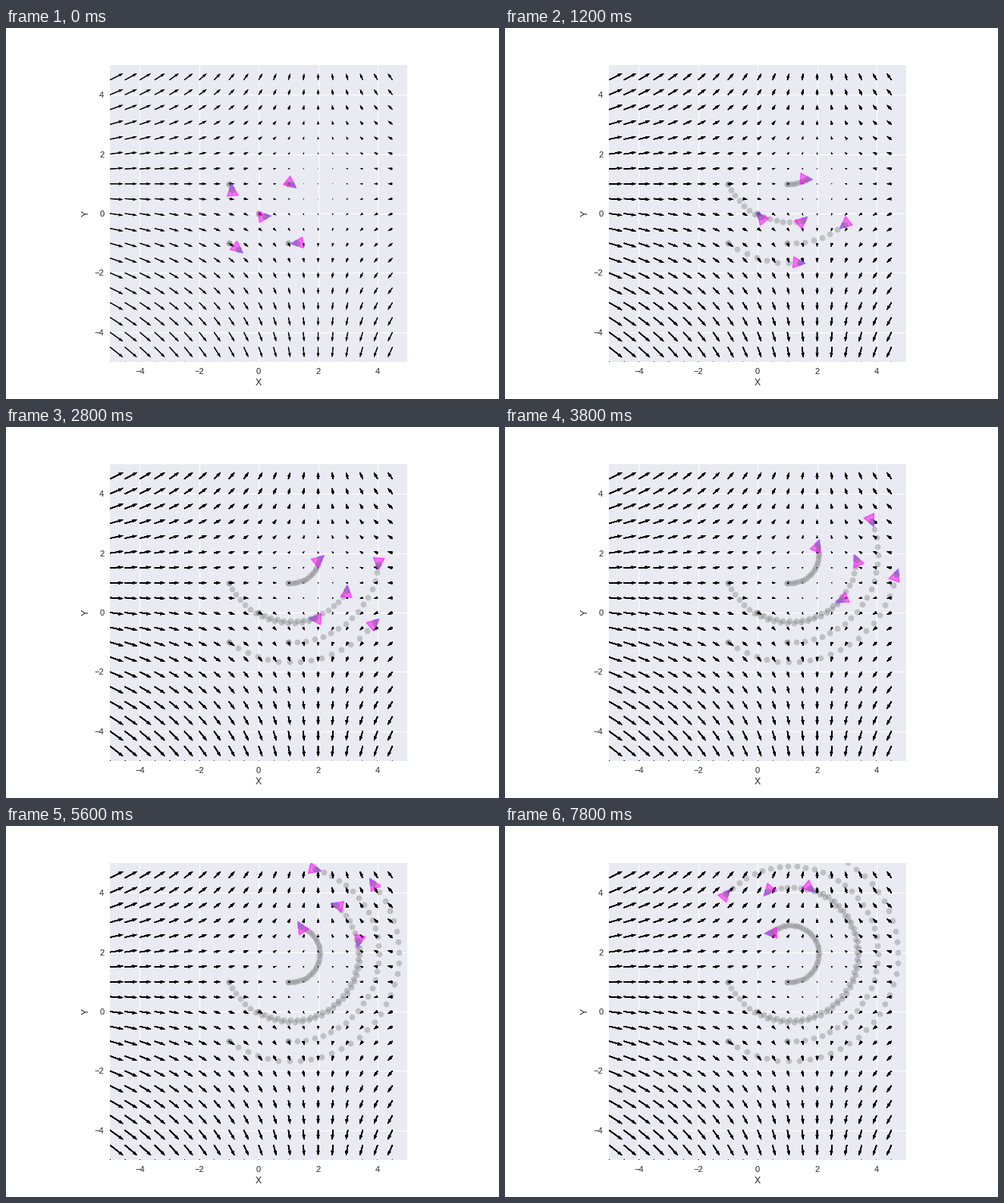
A matplotlib script for the animation above (8000 ms loop, 650 by 490 pixels).

```python
import numpy as np
import matplotlib.pyplot as plt
from matplotlib.animation import FuncAnimation
from matplotlib.collections import PolyCollection

DPI = 80
FRAMES = 40
DT = 0.1
MAX_LAYERS = 16
PX = 10 / 392  # one pixel in data units

plt.rcParams.update({
    "font.family": "Liberation Sans", "font.size": 10,
    "axes.labelsize": 11, "text.color": "0.15", "axes.labelcolor": "0.15",
    "xtick.color": "0.15", "ytick.color": "0.15",
})

# starting poses: x, y, heading in degrees
POSES = np.array([[1, 1, -45], [-1, -1, -45], [0, 0, 0],
                  [1, -1, 180], [-1, 1, 90]], float)
SPIN = np.array([[np.cos(DT), -np.sin(DT)], [np.sin(DT), np.cos(DT)]])
SHIFT = DT * np.array([2, -1])


def build_path():
    points = [POSES[:, :2]]
    for _ in range(FRAMES):
        points.append(points[-1] @ SPIN.T + SHIFT)
    return np.array(points)


path = build_path()

BODY = np.array([[7.6, 0], [-7.6, 7.2], [-7.6, -7.2]]) * PX
TIP = np.array([[9, 0], [1, 4.2], [1, -4.2]]) * PX


def place(shape, step):
    verts = []
    for (x, y), start in zip(path[step], np.radians(POSES[:, 2])):
        a = start + DT * step
        c, s = np.cos(a), np.sin(a)
        verts.append(shape @ np.array([[c, s], [-s, c]]) + (x, y))
    return verts


fig = plt.figure(figsize=(650 / DPI, 490 / DPI), dpi=DPI, facecolor="white")
ax = fig.add_axes([0.125, 0.1, 0.775, 0.8], facecolor="#EAEAF2")
ax.set_aspect("equal")
ax.set(xlim=(-5, 5), ylim=(-5, 5), xlabel="X", ylabel="Y",
       xticks=range(-4, 5, 2), yticks=range(-4, 5, 2))
ax.set_axisbelow(True)
ax.grid(color="white", lw=1, ls="-")
ax.tick_params(length=0, pad=7)
for spine in ax.spines.values():
    spine.set_visible(False)

# the arrows are painted over themselves, so their soft edges fill up
gx, gy = np.meshgrid(np.arange(-5, 5, 0.5), np.arange(-5, 5, 0.5))
fields = [ax.quiver(gx, gy, 2 - gx, gy - 1, color="black", zorder=3)
          for _ in range(MAX_LAYERS)]


def dots(zorder):
    return ax.scatter([], [], s=49, color="gray", alpha=0.4, lw=0,
                      zorder=zorder)


def triangles(color, alpha, width, zorder):
    shapes = PolyCollection([], facecolor=color, edgecolor=color, alpha=alpha,
                            linewidth=width, zorder=zorder)
    ax.add_collection(shapes, autolim=False)
    return shapes


trail, heads = dots(2), dots(6)
tips = triangles("deepskyblue", 0.5, 0.6, 4)
bodies = triangles("magenta", 0.5, 1.5, 5)
ax.set(xlim=(-5, 5), ylim=(-5, 5))


def update(i):
    step = i + 1
    for n, field in enumerate(fields):
        field.set_visible(n < i + 2)
    trail.set_offsets(np.concatenate([path[0], *path[:step + 1]]))
    heads.set_offsets(path[step])
    tips.set_verts(place(TIP, step))
    bodies.set_verts(place(BODY, step))
    return [trail, heads, tips, bodies, *fields]


anim = FuncAnimation(fig, update, frames=FRAMES, interval=200, repeat=True,
                     repeat_delay=0, init_func=lambda: update(0))
plt.show()
```
